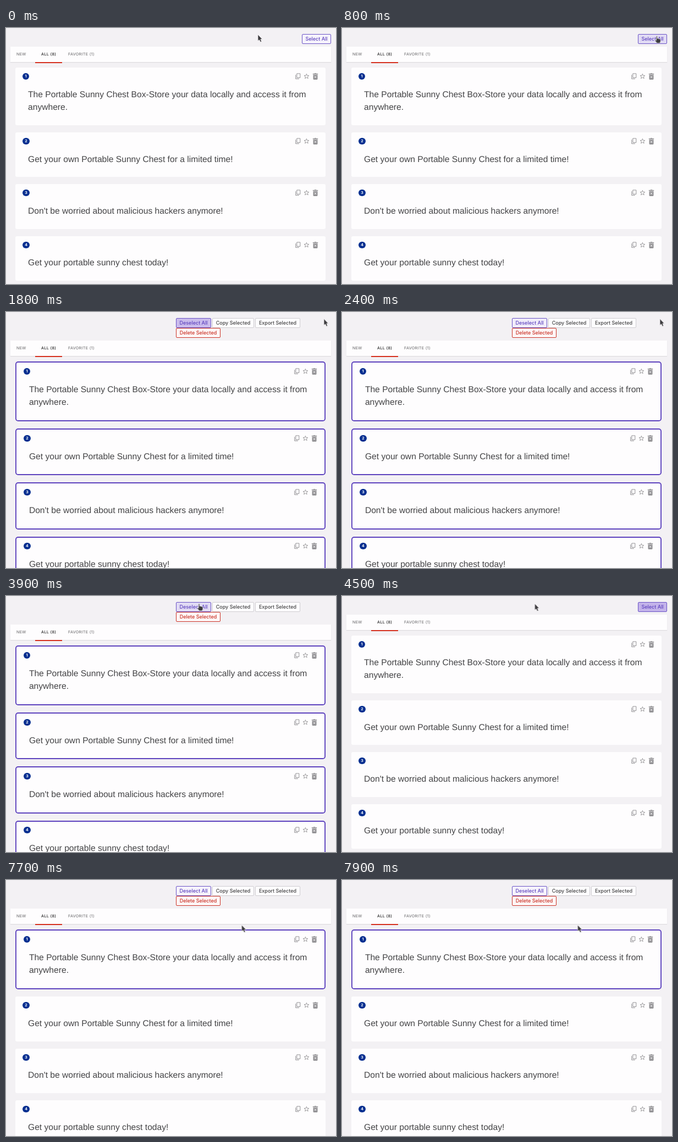
An HTML page that plays this animation: 600x466 px, repeating every 8 s.

```html
<!DOCTYPE html>
<html lang="en">
<head>
<meta charset="utf-8">
<title>Card selection</title>
<style>
:root { --purple: #5d42be; --edge: #6b54c6; --red: #cb3328; --pale: #f6f3fc; --hover: #e1dbf4; --press: #c3b3ea; }
* { box-sizing: border-box; }
html, body { margin: 0; width: 100%; height: 100%; overflow: hidden; }
body { background: #f3f1f4; text-rendering: geometricPrecision; }
.stage { position: relative; width: 600px; height: 466px; overflow: hidden; }

/* every animation shares one 8 s clock */
.page, .card, .solo, .once, .group, .group .all, .cursor, .arrow, .hand {
  animation: 8s step-end infinite;
}

/* buttons */
button {
  position: absolute; top: 11px; height: 18px; padding: 0;
  border: 1px solid #cfcdd1; border-radius: 2px; background: #fdfcfe;
  color: #444; font: 500 9px/16px Inter, sans-serif; white-space: nowrap;
}
.all { border-color: var(--edge); background: var(--pale); color: var(--purple); }
.solo { left: 538px; width: 53px; animation-name: solo; }
.once { left: 527px; width: 64px; background: #b9a8e4; animation-name: once; }
.group { animation-name: group; }
.group .all { left: 309px; width: 64px; animation-name: fill; }
.copy { left: 375px; width: 76px; }
.export { left: 453px; width: 82px; }
.delete { left: 309px; top: 29px; width: 81px; border-color: var(--red); background: #fdf6f6; color: var(--red); }

/* tabs */
.page { padding-top: 34px; animation-name: page; }
nav {
  position: relative; height: 28px; margin: 0 9px 10px 8px;
  background: #fefdfe; box-shadow: 0 1px 1px #dddbde;
  color: #626264; font: 400 7.1px/28px Inter, sans-serif; letter-spacing: .37px;
}
nav span { position: absolute; top: 0; white-space: nowrap; }
nav .on { left: 45px; width: 49px; height: 30px; padding-left: 11px; border-bottom: 2px solid #d5301f; color: #222; font-weight: 500; }

/* cards */
.card {
  width: 564px; margin: 0 0 13px 17px; border-radius: 3px; background: #fefdfe;
  animation-name: pick;
}
.card.first { animation-name: pick-first; }
.inner { position: relative; height: 81.45px; }
.first .inner { height: 104.9px; }
.inner p {
  position: absolute; left: 23px; top: 37.7px; margin: 0; white-space: nowrap;
  color: #434345; font: 15.63px/23.44px "Liberation Sans", Arial, sans-serif;
}
.inner b {
  position: absolute; left: 13px; top: 10px; width: 13px; height: 12px; border-radius: 6px;
  background: #062f90; color: #fff; font: 700 7px/12px Inter, sans-serif; text-align: center;
}
.first b { width: 12px; }
.inner svg { position: absolute; right: 12px; top: 9px; overflow: visible; }

/* cursor */
.cursor { position: absolute; left: 0; top: 0; overflow: visible; fill: #3c3b3e; stroke: #f6f5f7; stroke-width: .7; animation-name: move; }
.arrow { animation-name: arrow; }
.hand { animation-name: hand; }

@keyframes page {
  0%, 55% { padding-top: 34px; }
  21.25%, 96.25%, 100% { padding-top: 52.4px; }
}
@keyframes pick {
  0%, 55%, 100% { padding: 0; border-radius: 3px; box-shadow: none; }
  21.25% { padding: 1.9px; border-radius: 5px; box-shadow: inset 0 0 0 1.9px var(--purple); }
}
@keyframes pick-first {
  0%, 55% { padding: 0; border-radius: 3px; box-shadow: none; }
  21.25%, 96.25%, 100% { padding: 1.9px; border-radius: 5px; box-shadow: inset 0 0 0 1.9px var(--purple); }
}
@keyframes solo {
  0% { visibility: visible; background: var(--pale); }
  7.5% { visibility: visible; background: var(--hover); }
  20% { visibility: hidden; background: var(--press); }
  55%, 56.25% { visibility: visible; background: var(--press); animation-timing-function: steps(9); }
  67.5% { visibility: visible; background: var(--pale); }
  96.25%, 100% { visibility: hidden; background: var(--pale); }
}
@keyframes once {
  0%, 21.25%, 100% { visibility: hidden; }
  20% { visibility: visible; }
}
@keyframes group {
  0%, 55% { visibility: hidden; }
  21.25%, 96.25%, 100% { visibility: visible; }
}
@keyframes fill {
  0%, 21.25% { background: var(--press); animation-timing-function: steps(7); }
  30% { background: #f0ecfa; }
  42.5% { background: var(--hover); }
  55%, 100% { background: var(--pale); }
}
@keyframes arrow {
  0%, 20%, 55%, 100% { visibility: visible; }
  7.5%, 42.5% { visibility: hidden; }
}
@keyframes hand {
  0%, 20%, 55%, 100% { visibility: hidden; }
  7.5%, 42.5% { visibility: visible; }
}
@keyframes move {
  0% { transform: translate(458px, 12px); }
  1.25% { transform: translate(458px, 12px); animation-timing-function: steps(8); }
  11.25% { transform: translate(588px, 15px); animation-timing-function: steps(4); }
  16.25% { transform: translate(578px, 12.5px); }
  35% { transform: translate(578px, 12.5px); animation-timing-function: steps(2); }
  37.5% { transform: translate(535px, 10px); animation-timing-function: steps(3); }
  41.25% { transform: translate(390px, 10px); animation-timing-function: steps(3); }
  45% { transform: translate(350.5px, 14px); }
  72.5% { transform: translate(350.5px, 14px); animation-timing-function: steps(2); }
  75% { transform: translate(356px, 9px); animation-timing-function: steps(4); }
  80% { transform: translate(431px, 82px); }
  85% { transform: translate(431px, 82px); animation-timing-function: steps(2); }
  87.5%, 100% { transform: translate(428.5px, 82px); }
}
</style>
</head>
<body>
<svg width="0" height="0" style="position:absolute">
  <defs>
    <g id="tools" fill="none" stroke="#929194" stroke-width="1">
      <path d="M-.2 2h6v7.500h-6zM-2.300 4.200v7.400h6.200"/>
      <path stroke-width=".9" d="M17.400 2.500l1.200 3 3.200.2-2.500 2 .9 3.200-2.800-1.800-2.800 1.800.9-3.200-2.500-2 3.200-.2z"/>
      <path fill="#929194" stroke="none" d="M28.800 2h2.600l.7-.8h2.800l.7.8h2.600v1.500h-9.400zM29.500 4.300h8v7.200q0 1.500-1.500 1.500h-5q-1.500 0-1.500-1.500z"/>
      <path stroke="#fefdfe" d="M31.800 6.500l3.400 3.600m0-3.600l-3.400 3.600"/>
    </g>
  </defs>
</svg>

<div class="stage">
  <button class="all solo">Select All</button>
  <button class="all once">Deselect All</button>
  <div class="group">
    <button class="all">Deselect All</button>
    <button class="copy">Copy Selected</button>
    <button class="export">Export Selected</button>
    <button class="delete">Delete Selected</button>
  </div>

  <div class="page">
    <nav>
      <span style="left:11px">NEW</span>
      <span class="on">ALL (8)</span>
      <span style="left:105px">FAVORITE (1)</span>
    </nav>
    <div class="card first"><div class="inner">
      <b>1</b><svg width="40" height="14"><use href="#tools"/></svg>
      <p>The Portable Sunny Chest Box-Store your data locally and access it from<br>anywhere.</p>
    </div></div>
    <div class="card"><div class="inner">
      <b>2</b><svg width="40" height="14"><use href="#tools"/></svg>
      <p>Get your own Portable Sunny Chest for a limited time!</p>
    </div></div>
    <div class="card"><div class="inner">
      <b>3</b><svg width="40" height="14"><use href="#tools"/></svg>
      <p>Don't be worried about malicious hackers anymore!</p>
    </div></div>
    <div class="card"><div class="inner">
      <b>4</b><svg width="40" height="14"><use href="#tools"/></svg>
      <p>Get your portable sunny chest today!</p>
    </div></div>
  </div>

  <svg class="cursor" width="12" height="16">
    <path class="arrow" d="M0 0V11.500L2.500 9.500 4.600 13.500 6.700 12.500 4.800 8.600 7.800 8.200z"/>
    <path class="hand" d="M-.4 1Q.6-.8 1.600 1V4.500Q2.800 3.700 3.700 4.900 5 4.300 5.700 5.500 7.400 5.200 7.500 7V9.500L6.300 13H.8L-2.500 8.500Q-2.600 6.800-1.200 7.400L-.4 8.200z"/>
  </svg>
</div>
</body>
</html>
```
